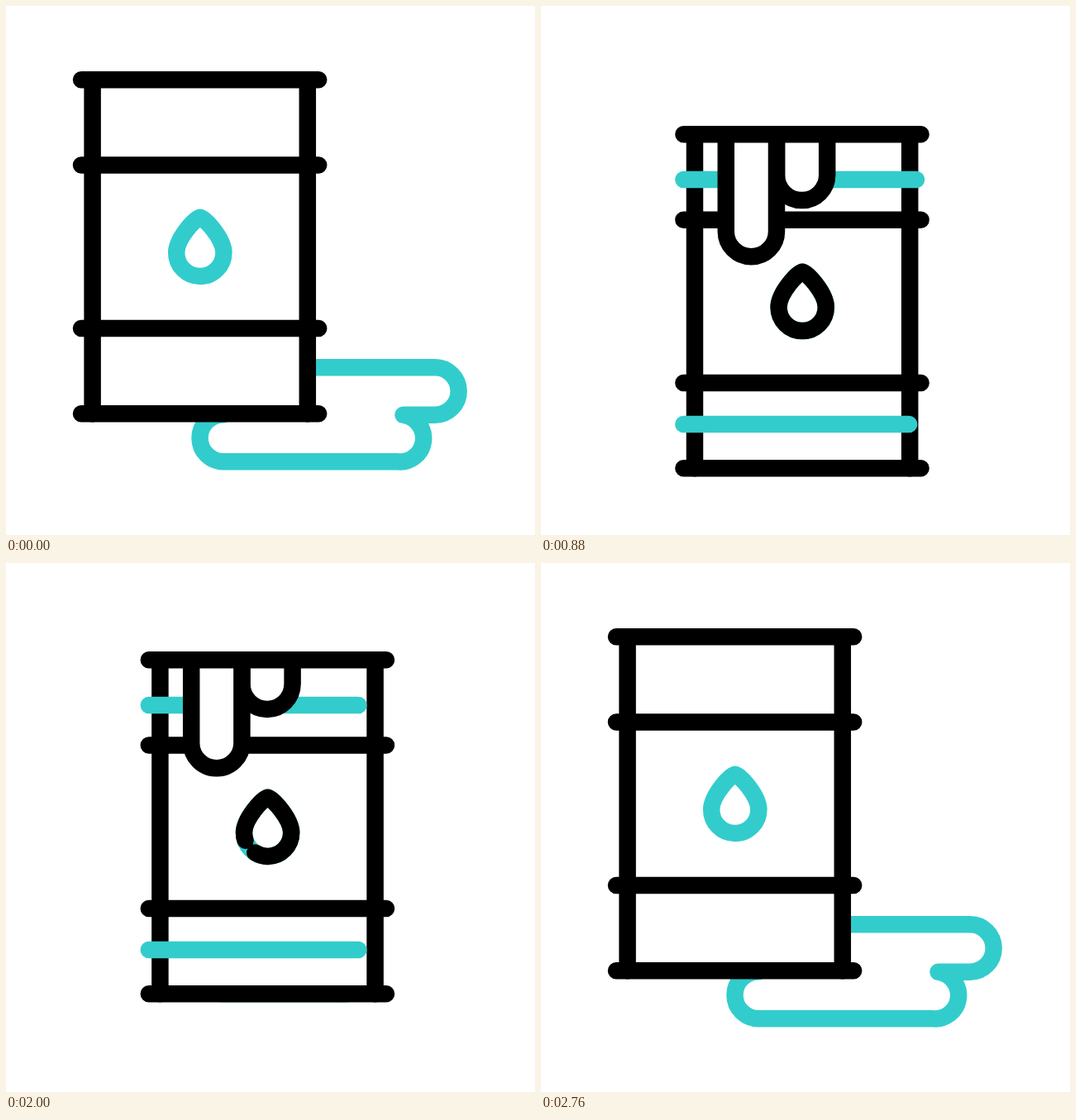
Recreate the animation shown at these times as an HTML page. Size 640 by 640 pixels, loop 3000 ms.

```html
<!DOCTYPE html>
<html lang="en">
<head>
<meta charset="utf-8">
<title>Oil barrel</title>
<style>
  html, body { margin: 0; width: 100%; height: 100%; overflow: hidden; background: #fff; }
  svg { display: block; width: 100%; height: 100%; }
  path { fill: none; stroke: #000; stroke-width: 20.5; stroke-linecap: round; stroke-linejoin: round; }
  .teal { stroke: #3cc; }
  .drip { fill: #fff; }
</style>
</head>
<body>
<svg viewBox="0 0 640 640">
  <clipPath id="belowLid"><rect x="80" y="89" width="320" height="420"/></clipPath>
  <path id="puddle" class="teal"/>
  <g id="barrel">
    <rect x="104" y="89" width="261" height="404" fill="#fff"/>
    <path d="M104.6 89.3V493.3M364.8 89.3V493.3M91 192.6H378.2M91 390H378.2"/>
    <path id="upperBar" class="teal"/>
    <path id="lowerBar" class="teal"/>
    <g clip-path="url(#belowLid)">
      <path id="shortDrip" class="drip"/>
      <path id="longDrip" class="drip"/>
    </g>
    <path d="M91 89.3H378.2M91 493.3H378.2"/>
    <path class="teal drop"/>
    <path id="ink" class="drop" pathLength="1"/>
  </g>
</svg>
<script>
const $ = id => document.getElementById(id);
const { puddle, barrel, upperBar, lowerBar, shortDrip, longDrip, ink } =
  Object.fromEntries([...document.querySelectorAll('[id]')].map(el => [el.id, el]));

// Drop outline, clockwise from its lowest point
for (const el of document.querySelectorAll('.drop')) {
  el.setAttribute('d', 'M234.8 327A28.6 28.6 0 0 1 206.2 298.4C206.2 281 230 255.7 234.8 255.7' +
    'S263.4 281 263.4 298.4A28.6 28.6 0 0 1 234.8 327Z');
}

// Progress from start to end along cubic-bezier(a, 0, b, 1)
function ease(t, start, end, a = 1 / 3, b = 2 / 3) {
  const x = (t - start) / (end - start);
  if (x <= 0) return 0;
  if (x >= 1) return 1;
  let lo = 0, hi = 1, u;
  for (let i = 0; i < 24; i++) {
    u = (lo + hi) / 2;
    const v = 1 - u;
    if (3 * u * v * v * a + 3 * u * u * v * b + u ** 3 < x) lo = u; else hi = u;
  }
  return u * u * (3 - 2 * u);
}

function show(el, visible) {
  el.style.display = visible ? '' : 'none';
}

function drawBar(el, y, amount) {
  show(el, amount > 0.001);
  el.setAttribute('d', `M91 ${y}H${91 + 287.2 * amount}`);
}

function drawDrip(el, left, length) {
  show(el, length > 20);
  const y = 38 + length, r = 30.6;
  el.setAttribute('d', `M${left} 0V${y}A${r} ${r} 0 0 0 ${left + 2 * r} ${y}V0`);
}

function drawPuddle(shrink, lift) {
  show(puddle, shrink < 1);
  const outer = 519 - 102 * shrink, inner = 472.8 - 71 * shrink;
  puddle.setAttribute('d', `M330 437.3H${outer}a28.7 28.7 0 0 1 0 57.4H${inner + 7.7}` +
    `A28.5 28.5 0 0 1 ${inner} 551.2H263a28.5 28.5 0 0 1 0 -57`);
  puddle.setAttribute('transform', `translate(0 ${-lift})`);
}

function draw(t) {
  const go = ease(t, 160, 960, .445, .308);
  const back = ease(t, 1960, 2760, .606, .192);
  const rise = ease(t, 740, 1540);
  barrel.setAttribute('transform',
    `translate(${82 * go * (1 - back)} ${(70 * go - 42 * rise) * (1 - back)})`);

  const gather = ease(t, 160, 880);
  const spill = ease(t, 1960, 2760, .578, .158);
  drawPuddle(gather - spill, t > 1800 ? 30 * (1 - spill) : 0);

  drawBar(upperBar, 144, ease(t, 160, 960, .224, .6) - ease(t, 1800, 2520, .545, .5));
  drawBar(lowerBar, 440, ease(t, 327, 968) - ease(t, 1800, 2400, .714, .394));

  const grow = ease(t, 500, 900);
  const retract = Math.min(1, Math.max(0, (t - 1800) / 1000));
  drawDrip(shortDrip, 203.6, (101.5 - 4 * rise) * grow - 85 * retract);
  drawDrip(longDrip, 142.4, (170.5 - 9 * rise) * grow - 161 * ease(t, 1880, 2689));

  const length = gather - ease(t, 1800, 2520, .6, .5);
  const start = t < 1800 ? -length / 2 : .2 * length;
  show(ink, length > 0.001);
  ink.style.strokeDasharray = length > .999 ? 'none' : `${length} ${1 - length}`;
  ink.style.strokeDashoffset = -start;
}

function tick() {
  draw(performance.now() % 3000);
  requestAnimationFrame(tick);
}
tick();
</script>
</body>
</html>
```
